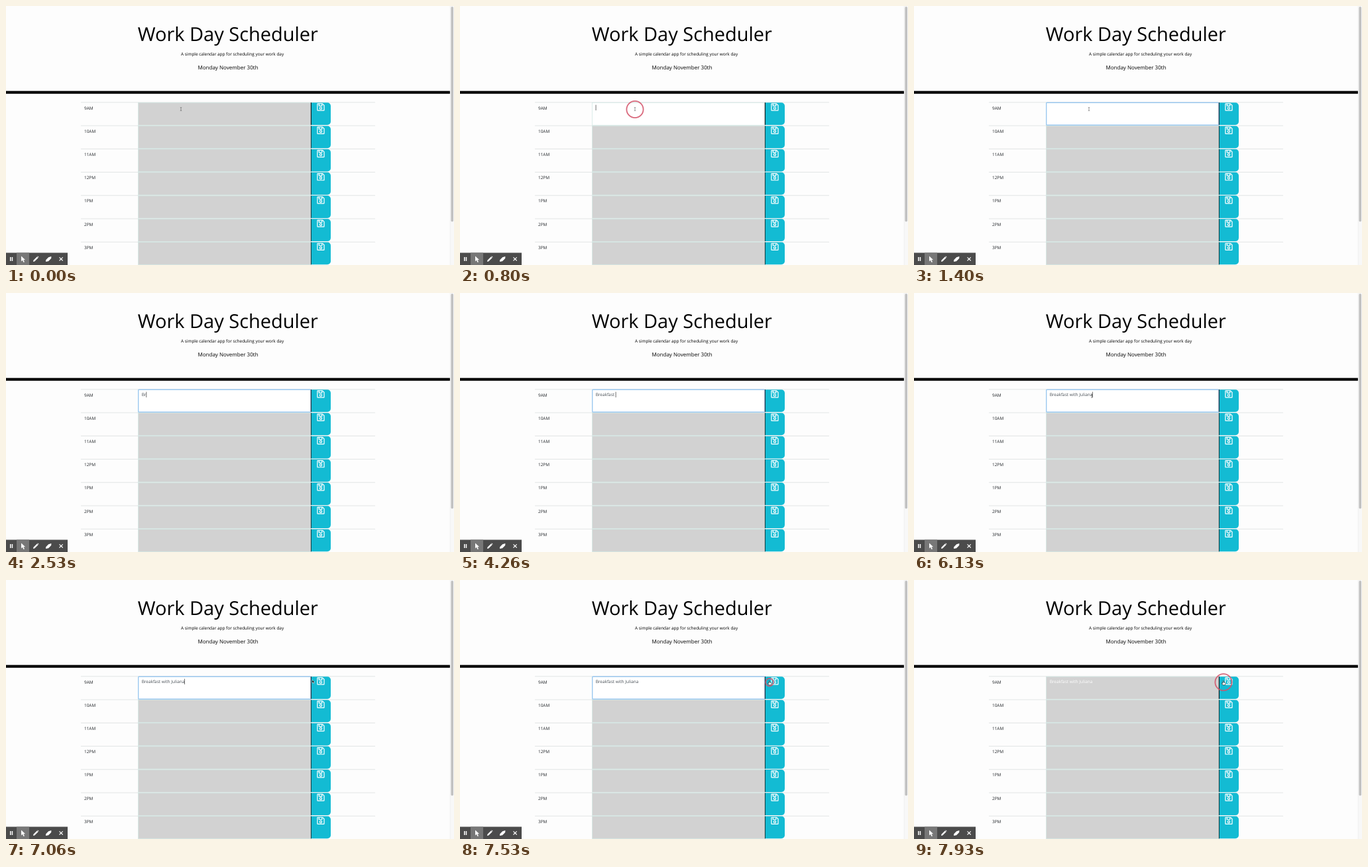
An HTML page that plays this animation: 676 px wide and 392 px high, repeating every 8000 ms.

```html
<!DOCTYPE html>
<html lang="en">
<head>
<meta charset="utf-8">
<title>Work Day Scheduler</title>
<style>
html, body { margin: 0; width: 100%; height: 100%; overflow: hidden; background: #fdfdfd; }
svg { display: block; width: 676px; height: 392px; }
text { font: 6.44px "Open Sans", sans-serif; fill: #212529; text-rendering: geometricPrecision; white-space: pre; }
.title { font-size: 28.98px; fill: #000; }
.sub { fill: #000; }
.date { font-size: 8.05px; fill: #000; }
.mid { text-anchor: middle; }
.line { stroke: #dfe2e2; stroke-width: .9; }
.slot { fill: #d2d2d2; stroke: #cfe6e2; stroke-width: .7; }
</style>
</head>
<body>
<svg viewBox="0 0 676 392">
  <defs>
    <g id="disk" fill="none" stroke="#fff" stroke-width="48" stroke-linejoin="round">
      <path d="M48 56H316a24 24 0 0 1 17 7L417 147a24 24 0 0 1 7 17V432a24 24 0 0 1-24 24H48a24 24 0 0 1-24-24V80a24 24 0 0 1 24-24Z"/>
      <path d="M120 56V184H296V56"/>
      <circle cx="224" cy="320" r="64"/>
    </g>
    <path id="arrow" d="M0 0V8.2L2 6.4 3.4 9.6 4.9 9 3.5 5.9H6.1Z"/>
  </defs>

  <text class="title mid" x="334.8" y="53.4">Work Day Scheduler</text>
  <text class="sub mid" x="341.6" y="75.1">A simple calendar app for scheduling your work day</text>
  <text class="date mid" x="335" y="95.5">Monday November 30th</text>
  <rect y="128.6" width="670" height="4.2"/>

  <g id="rows"></g>

  <rect id="glow" x="199.7" y="146.3" width="260.2" height="34" rx="1" fill="none" stroke="#9cc9f0" stroke-width="1.4"/>
  <path d="M460.4 146.2V180" stroke="#111" stroke-width=".8"/>
  <text id="entry" x="204.7" y="156.2"></text>
  <rect id="caret" y="149.6" width=".7" height="8.4" fill="#333"/>

  <g id="pointer">
    <path id="beam" d="M-1.2-2.6Q0-2.6 0-1.8V1.8Q0 2.6-1.2 2.6M1.2-2.6Q0-2.6 0-1.8M0 1.8Q0 2.6 1.2 2.6" fill="none" stroke="#555" stroke-width=".6"/>
    <use id="tip" href="#arrow" transform="scale(.6)" stroke="#fff" stroke-width=".8"/>
    <path id="hand" d="M-.9-2.6Q-.3-3.2.3-2.6V-.6L2.6 0Q3.2.3 3 1.2L2.4 3.4H-.9L-2.7.8Q-2.5-.1-1.6.4L-.9 1Z" fill="#fff" stroke="#111" stroke-width=".6"/>
  </g>
  <circle id="ring" fill="none" stroke="#d4536a" stroke-width="1.8"/>

  <rect x="670" width="6" height="392" fill="#f8f8f8"/>
  <path d="M670.2 0V392" stroke="#e6e6e6" stroke-width=".5"/>
  <rect x="671.4" y="1" width="3.6" height="325.5" rx="1.8" fill="#c1c1c1"/>

  <rect y="373.5" width="93" height="18.5" fill="#4b4b4b"/>
  <rect x="16" y="373.5" width="19" height="18.5" fill="#777"/>
  <g fill="#fff">
    <path d="M6 380h1.5v6H6ZM8.7 380h1.5v6H8.7Z"/>
    <use href="#arrow" x="23" y="378.4"/>
    <path d="M41 387 41.5 384.8 46.8 379.5 48.5 381.2 43.2 386.5ZM47.3 379 48 378.4 49.6 380 49 380.7Z"/>
    <path d="M60 384.4 64.2 380.2 68.4 379 68.2 382 64 386.2 60 387Z"/>
    <path d="M80.5 380.3 85.7 385.5M85.7 380.3 80.5 385.5" stroke="#fff" stroke-width="1.1"/>
  </g>
</svg>
<script>
const LOOP = 8000, PITCH = 35.22, TOP = 146;
const $ = id => document.getElementById(id);
const set = (el, attrs) => { for (const k in attrs) el.setAttribute(k, attrs[k]); };
const show = (el, on) => el.setAttribute('visibility', on ? 'visible' : 'hidden');
const clamp = x => Math.min(1, Math.max(0, x));

const hours = ['9AM', '10AM', '11AM', '12PM', '1PM', '2PM', '3PM'];
$('rows').innerHTML = hours.map((hour, i) => {
  const y = TOP + i * PITCH;
  return `<path class="line" d="M113 ${y - .1}H557"/>
    <rect class="slot" x="199.6" y="${y + .3}" width="260.4" height="34"/>
    <path d="M460 ${y + .2}H485a5 5 0 0 1 5 5V${y + 29}a5 5 0 0 1-5 5H460Z" fill="#13bbd3"/>
    <path d="M460.4 ${y + .2}V${y + 34}" stroke="#111" stroke-width=".8"/>
    <use href="#disk" transform="translate(469.3 ${y + .5}) scale(.0254)"/>
    <text x="118" y="${y + 10.5}">${hour}</text>`;
}).join('');
const slot = document.querySelector('.slot');

const phrase = 'Breakfast with Juliana';
const keys = [2060, 2530, 2730, 2930, 3130, 3300, 3400, 3600, 3800, 4260, 4330,
  4430, 4530, 4660, 4800, 4960, 5130, 5230, 5330, 5430, 5560, 5660];
const FOCUS = 800, BLUR = 7700, BLINK = 530;

// Pointer stops: time, x, y
const path = [[6130, 268, 156], [6460, 352, 118], [6660, 420, 104], [7060, 462, 151], [7400, 467, 155.5]];
const clicks = [{ at: 470, x: 264, y: 156.5 }, { at: 7470, x: 467, y: 154.8 }];

function pointerAt(t) {
  if (t < path[0][0]) return [264, 156];
  const i = path.findIndex(p => p[0] > t);
  if (i < 0) return path[path.length - 1].slice(1);
  const [t0, x0, y0] = path[i - 1], [t1, x1, y1] = path[i];
  const k = (t - t0) / (t1 - t0);
  return [x0 + (x1 - x0) * k, y0 + (y1 - y0) * k];
}

function drawField(t) {
  const focused = t >= FOCUS && t < BLUR;
  const count = keys.filter(k => k <= t).length;
  const last = count ? keys[count - 1] : FOCUS;
  slot.style.fill = focused ? '#fff' : '#d2d2d2';
  set($('glow'), { opacity: clamp((t - FOCUS) / 150) * clamp(1 - (t - BLUR) / 150) });
  $('entry').textContent = phrase.slice(0, count);
  $('entry').style.fill = focused ? '#495057' : '#fff';
  const width = count ? $('entry').getComputedTextLength() : 0;
  set($('caret'), { x: 204.7 + width });
  show($('caret'), focused && Math.floor((t - last) / BLINK) % 2 === 0);
}

function drawPointer(t) {
  const [x, y] = pointerAt(t);
  const on = t < keys[0] || t >= path[0][0];
  const overButton = x > 460.5 && y > TOP;
  const overField = !overButton && y > TOP;
  set($('pointer'), { transform: `translate(${x} ${y})` });
  show($('beam'), on && overField);
  show($('tip'), on && (!overField && !overButton || overButton && t < 7130));
  show($('hand'), on && overButton && t >= 7130);
}

function drawRing(t) {
  const click = clicks.find(c => t >= c.at && t < c.at + 730);
  show($('ring'), click);
  if (!click) return;
  const age = t - click.at;
  const grow = 1 - (1 - clamp(age / 230)) ** 2;
  set($('ring'), { cx: click.x, cy: click.y, r: 12.6 * grow, opacity: .88 * (1 - clamp((age - 530) / 200)) });
}

const start = performance.now();
function frame() {
  const t = (performance.now() - start) % LOOP;
  drawField(t);
  drawPointer(t);
  drawRing(t);
  requestAnimationFrame(frame);
}
frame();
</script>
</body>
</html>
```
